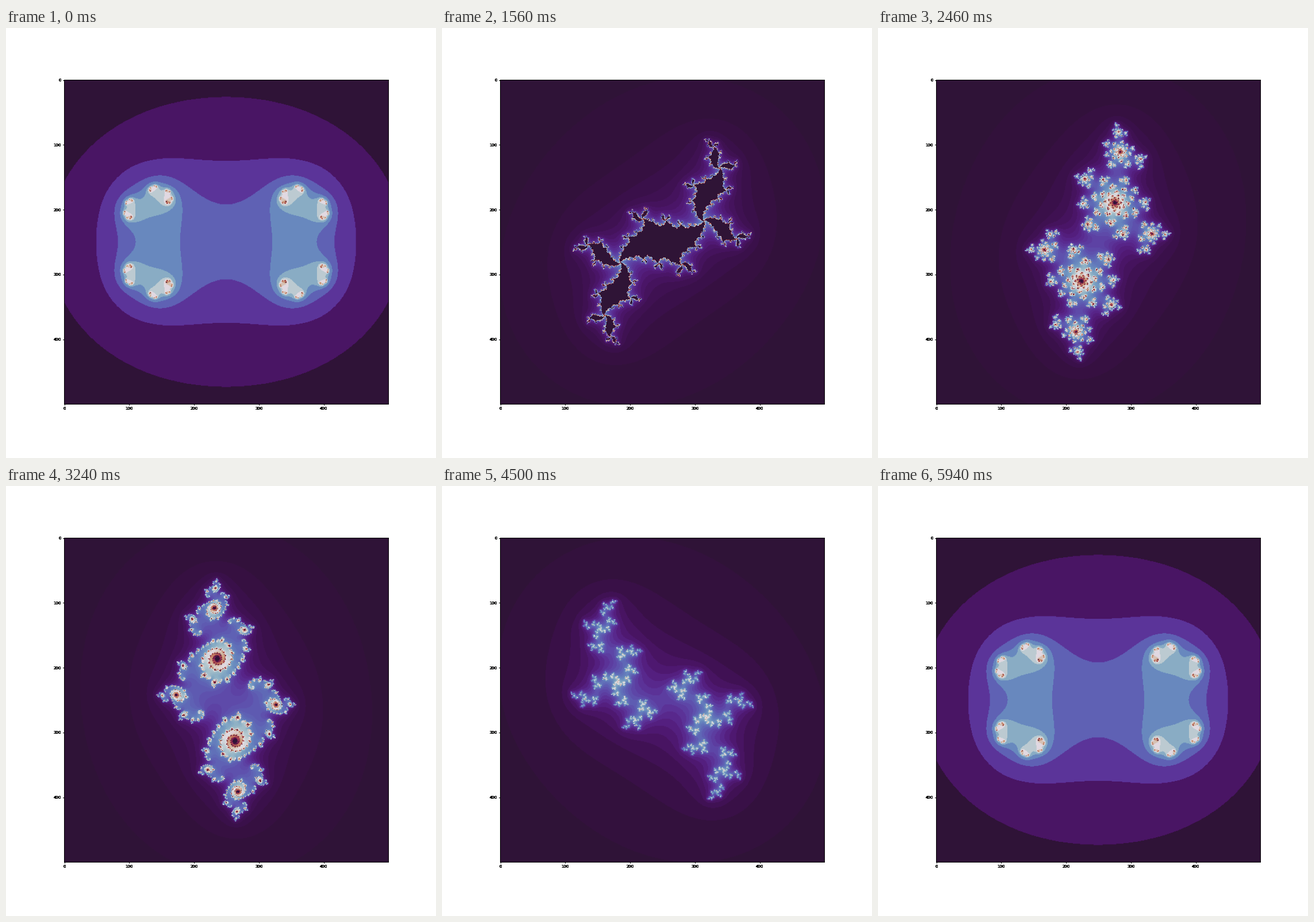
Recreate the animation shown at these times as a matplotlib script. Size 748 px wide and 748 px high, loop 6 s.

```python
import numpy as np
import matplotlib.pyplot as plt
from matplotlib.animation import FuncAnimation

SIZE, DPI = 748, 50
CELLS = 500
FRAMES, INTERVAL = 100, 60
LIMIT = 80          # most iterations per point
ESCAPE = 4.0
RADIUS = 0.7885     # c travels once round this circle
LEFT, BOTTOM, SIDE = 101, 94, 564
LAYERS = 6

axis = np.linspace(-2, 2, CELLS)
# Real part runs down, imaginary part runs across. The set is symmetric
# under z -> -z, so only the upper half is computed.
half = (axis[:CELLS // 2, None] + 1j * axis[None, :]).ravel()
angles = np.linspace(0, 2 * np.pi, FRAMES)


def julia(c):
    """Escape step of every grid point for z -> z*z + c."""
    steps = np.full(half.size, LIMIT - 1, dtype=float)
    alive = np.arange(half.size)
    z = half.copy()
    for n in range(LIMIT):
        z = z * z + c
        far = z.real ** 2 + z.imag ** 2 > ESCAPE ** 2
        if far.any():
            steps[alive[far]] = n
            near = ~far
            z, alive = z[near], alive[near]
        if not alive.size:
            break
    top = steps.reshape(CELLS // 2, CELLS)
    return np.vstack([top, top[::-1, ::-1]])


def frame_axes():
    box = [v / SIZE for v in (LEFT, BOTTOM, SIDE, SIDE)]
    ax = fig.add_axes(box, facecolor="none")
    ax.set_xlim(-0.5, CELLS - 0.5)
    ax.set_ylim(CELLS - 0.5, -0.5)
    ax.set_xticks(range(0, CELLS, 100))
    ax.set_yticks(range(0, CELLS, 100))
    return ax


fig = plt.figure(figsize=(SIZE / DPI, SIZE / DPI), dpi=DPI, facecolor="white")
# Stacked axes give the small labels and border their solid black.
ax = [frame_axes() for _ in range(LAYERS)][0]
image = ax.imshow(julia(RADIUS), cmap="twilight_shifted", aspect="auto")


def update(i):
    image.set_data(julia(RADIUS * np.exp(1j * angles[i])))
    image.autoscale()   # colours span each picture's own range
    return [image]


anim = FuncAnimation(fig, update, frames=FRAMES, interval=INTERVAL,
                     repeat=True, repeat_delay=0)
plt.show()
```
